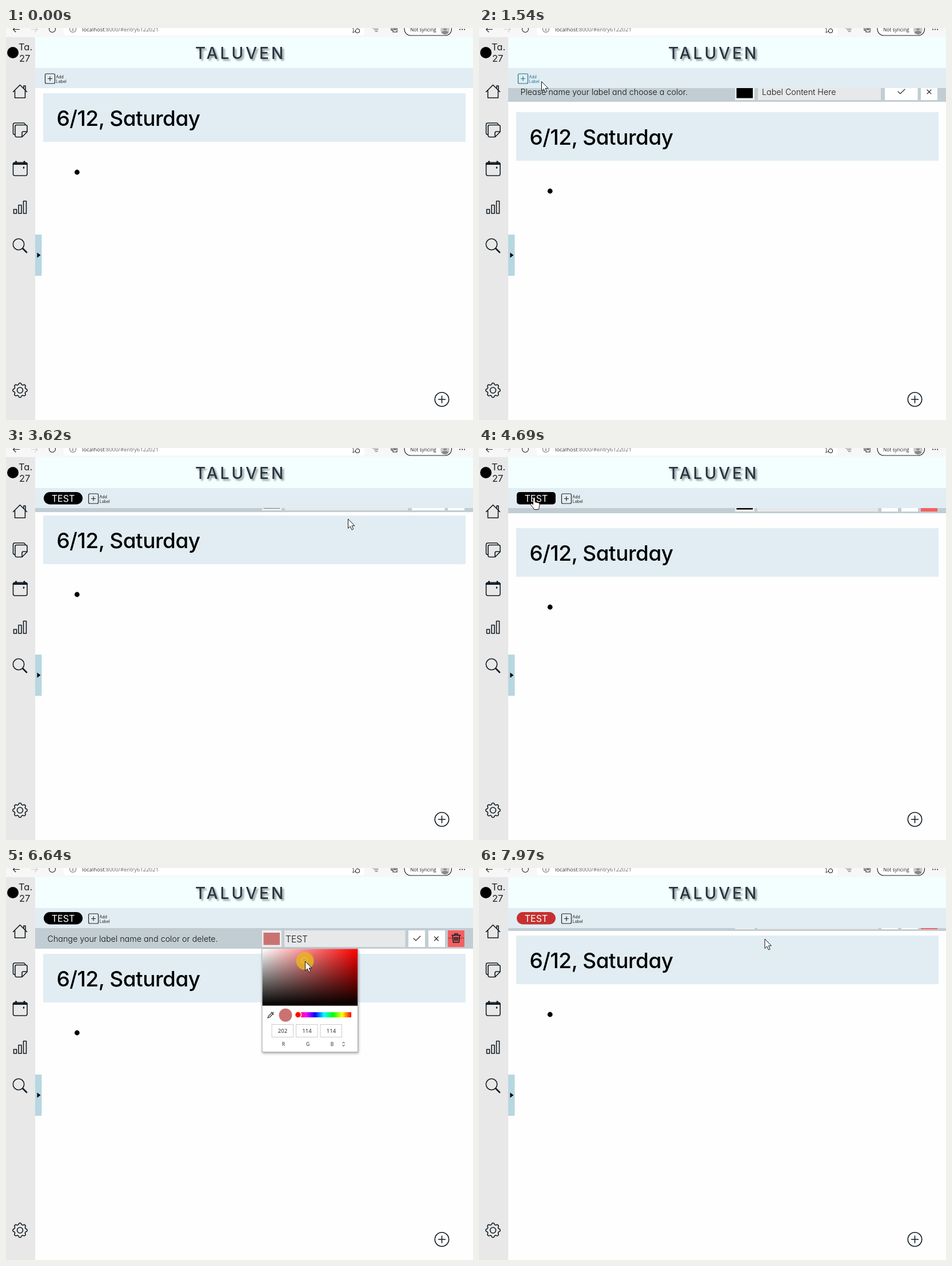
An HTML page for the animation above (8000 ms loop, 817 px wide and 685 px high).

```html
<!DOCTYPE html>
<html lang="en">
<head>
<meta charset="utf-8">
<title>Journal labels</title>
<style>
  html, body { margin: 0; width: 100%; height: 100%; overflow: hidden; background: #fefefe; }
  svg { display: block; }
  text { font-family: Inter, "Open Sans", sans-serif; font-feature-settings: "cv11"; }
  .chrome text, .rgb text { font-family: "Open Sans", sans-serif; }
  .line { fill: none; stroke: #111b22; stroke-width: 1.6; stroke-linejoin: round; stroke-linecap: round; }
  .thin { fill: none; stroke: #222; stroke-width: 1.1; stroke-linecap: round; }
  .body { font-size: 14.3px; font-weight: 300; fill: #111; }
  .mid { text-anchor: middle; }
  .title { font-size: 28px; font-weight: 500; letter-spacing: 4px; fill: #263640; filter: drop-shadow(3px 3px 1.5px #0006); }
</style>
</head>
<body>
<svg width="817" height="685" viewBox="0 0 817 685">
  <defs>
    <linearGradient id="sat"><stop stop-color="#fff"/><stop offset="1" stop-color="#f00"/></linearGradient>
    <linearGradient id="dark" x2="0" y2="1"><stop stop-opacity="0"/><stop offset="1"/></linearGradient>
    <linearGradient id="hue"></linearGradient>
  </defs>
  <rect width="817" height="685" fill="#fefefe"/>

  <g id="page">
    <rect x="65" y="114" width="739" height="85" fill="#e1edf3"/>
    <text x="88.5" y="171" font-size="37" font-weight="500" letter-spacing="-.5">6/12, Saturday</text>
    <circle cx="124.3" cy="252" r="4.4"/>
  </g>

  <g id="addBar">
    <rect x="51" y="105" width="766" height="36" fill="#c1cdd3"/>
    <text class="body" x="72.5" y="128.5">Please name your label and choose a color.</text>
    <rect x="448" y="109" width="34" height="29" fill="#efefef"/>
    <rect x="450.5" y="113" width="28.5" height="21.5"/>
    <rect x="488" y="109.5" width="215" height="28.5" fill="#e7e8ea"/>
    <rect id="focus" x="488.5" y="111" width="211.5" height="27" rx="2.5" fill="#e7e8ea" stroke="#101010" stroke-width="2"/>
    <text id="typed" class="body"></text>
    <path id="caret" class="thin" d="M0 117V133"/>
    <rect id="okay" x="710" y="109" width="57.5" height="29" fill="#fff"/>
    <path class="thin" d="M733 123l4 4 8-8"/>
    <rect x="773" y="109" width="29" height="29" fill="#fff"/>
    <path class="thin" d="M784 120l7 7m0-7l-7 7"/>
  </g>

  <g id="editBar">
    <rect x="51" y="105" width="766" height="36" fill="#c1cdd3"/>
    <text class="body" x="72.5" y="128.5">Change your label name and color or delete.</text>
    <rect x="448" y="109" width="34" height="29" fill="#efefef"/>
    <rect id="swatch" x="450.5" y="113" width="28.5" height="21.5"/>
    <rect x="487" y="109" width="211.5" height="29" fill="#e7e8ea"/>
    <text x="489" y="129.5" font-size="15.6" font-weight="300" fill="#111">TEST</text>
    <rect id="save" x="704" y="109" width="29" height="29" fill="#fff"/>
    <path class="thin" d="M713 123l4 4 8-8"/>
    <rect x="739" y="109" width="29" height="29" fill="#fff"/>
    <path class="thin" d="M749.5 120l7 7m0-7l-7 7"/>
    <rect x="773" y="109" width="29" height="29" fill="#f65f60"/>
    <path d="M773 121h29v3h-29z" fill="#b9595b"/>
    <path class="line" d="M780 117.5H795M785 117v-2h5v2M781.5 118l1 12h10l1-12M785 121v6m2.5-6v6m2.5-6v6"/>
  </g>

  <rect x="51" y="16" width="766" height="54" fill="#f3feff"/>
  <text class="title mid" x="410" y="53.5">TALUVEN</text>
  <rect x="51" y="70" width="766" height="35" fill="#e1edf3"/>
  <g id="label">
    <rect id="pill" x="66" y="77" width="68" height="21.5"/>
    <text class="mid" x="100" y="94" font-size="16" fill="#fff">TEST</text>
  </g>
  <g id="add" fill="#222" stroke="#222">
    <path d="M70.5 80h13a2 2 0 0 1 2 2v13a2 2 0 0 1-2 2h-13a2 2 0 0 1-2-2v-13a2 2 0 0 1 2-2zM77 84.5v8M73 88.5h8" fill="none" stroke-width="1.2"/>
    <g font-size="7" stroke="none"><text x="87.5" y="87.5">Add</text><text x="87.5" y="96.3">Label</text></g>
  </g>

  <rect y="16" width="51" height="669" fill="#e8e8e8"/>
  <circle cx="12" cy="43" r="10"/>
  <g font-size="16.5" fill="#222"><text x="22" y="39">Ta.</text><text x="23" y="58.5">27</text></g>
  <g class="line">
    <path d="M12.5 111.500L24.5 99.5 36.5 111.5M15.5 109v13h18v-13M31 105v-4h3v7"/>
    <path d="M15 186.5a3 3 0 0 1-2.500-3V169a3 3 0 0 1 3-3H31a3 3 0 0 1 2.500 2.500M18.5 169.5h16a2.500 2.500 0 0 1 2.500 2.500v9.500l-9 9h-9.500a2.500 2.500 0 0 1-2.500-2.500v-16a2.500 2.500 0 0 1 2.500-2.500zM28 190v-6.500a2.500 2.500 0 0 1 2.500-2.500h6.300"/>
    <rect x="12.5" y="235" width="24.5" height="23" rx="3"/>
    <path d="M13 237.5H36.500M17.500 233.500v2M32 233.500v2" stroke-width="3"/>
    <path d="M31 243.500v1" stroke-width="2.400"/>
    <path d="M13.500 317h5v7h-5zM22 309.500h5v14.500h-5zM30.500 302.500h5v21.500h-5z"/>
    <circle cx="22" cy="378" r="9.700"/><path d="M29.500 385.500l6.500 6.500" stroke-width="2.800"/>
    <path id="gear"/><circle cx="24.500" cy="633" r="5"/>
    <circle cx="762.500" cy="649" r="12.200"/><path d="M762.500 643v12M756.500 649h12"/>
  </g>
  <rect x="51" y="361" width="11.500" height="72" fill="#b7d7e1"/>
  <path d="M54.500 392.500L60.500 397l-6 4.500z"/>

  <g class="chrome">
    <rect width="817" height="16" fill="#f7f7f7"/>
    <rect x="101" y="-10" width="526" height="23" rx="4" fill="#fff"/>
    <g class="thin">
      <path d="M12.500 2.500h11M17 7l-4.500-4.500 4.500-4.500"/>
      <path d="M44 2.500h11M50.500 7l4.500-4.500-4.500-4.500" stroke="#ccc"/>
      <circle cx="81" cy="2" r="5.500"/><circle cx="117" cy="2" r="5.500" stroke="#777"/>
      <path d="M117 1v4M607 0l1 3-1 5 4-2M641 0h10M644 3h7M646 6h4" stroke="#555"/>
      <circle cx="615" cy="5" r="3.500"/>
      <path d="M674-2v6h2M677-2v9h7V-2M680.500 0v4M678.500 2h4"/>
      <rect x="697" y="-9" width="82.500" height="22" rx="11" fill="#fff"/>
    </g>
    <text x="133" y="6" font-size="9.440" fill="#666"><tspan fill="#333">localhost</tspan>:8000/#entry6122021</text>
    <text x="707" y="5.500" font-size="8.400" fill="#222">Not syncing</text>
    <circle cx="768" cy="3.500" r="8" fill="#c9c9c9"/>
    <path d="M762 9q0-4 6-4t6 4l-6 2.500zM765 1a3 3 0 1 0 6 0z" fill="#888"/>
    <path d="M794 2.500h.1M798 2.500h.1M802 2.500h.1" stroke="#222" stroke-width="2" stroke-linecap="round"/>
  </g>

  <g id="picker">
    <rect x="448" y="141" width="167.500" height="180.500" fill="#fff" stroke="#aaa" style="filter:drop-shadow(1px 2px 2px #0005)"/>
    <rect x="448.500" y="141.500" width="166.500" height="99" fill="url(#sat)"/>
    <rect x="448.500" y="141.500" width="166.500" height="99" fill="url(#dark)"/>
    <circle id="ring" r="5" fill="none" stroke="#fff" stroke-width="1.500"/>
    <path class="thin" d="M458 262l1-3 6-6 2 2-6 6zM464 252l4 4M466 254l2-2"/>
    <circle id="chip" cx="489" cy="257" r="11.500"/>
    <rect x="509" y="252" width="95" height="9" fill="url(#hue)"/>
    <circle cx="511" cy="256.500" r="5.500" fill="#f00" stroke="#fff" stroke-width="1.500"/>
    <g class="rgb mid" font-size="9.600" fill="#222"></g>
    <path d="M588.500 306.500l2-2.500 2 2.500M588.500 309l2 2.500 2-2.500" fill="none" stroke="#333"/>
  </g>

  <g id="cursor">
    <circle id="press" r="15.500" fill="#e6b422" opacity=".85"/>
    <g fill="#fff" stroke="#111" stroke-linejoin="round">
      <path id="arrow" d="M.5.5V17l3.800-3.600 2.700 6 2.700-1.200-2.600-5.800H12z"/>
      <path id="hand" d="M-3.500 2a1.800 1.800 0 0 1 3.600 0v6.500l6 1.200q2 .5 2 2.500l-.6 4.500q-.5 3-1.500 4.800h-7.500q-1-2.500-3.500-5l-3-4q0-2 2.500-1.500l2 1.800z"/>
      <path id="beam" d="M-3-8h2.500l.5.500.5-.5H3M0-7.500v15M-3 8h2.500l.5-.5.5.5H3" fill="none"/>
    </g>
  </g>
</svg>
<script>
const LOOP = 8000, SLIDE = 500, HEIGHT = 36;
const ADD_OPEN = 1225, ADD_CLOSE = 3328, EDIT_OPEN = 4475, EDIT_CLOSE = 7660;
const PICK_FROM = 6150, PICK_TO = 7100;

// time, x, y of the pointer tip
const PATH = [
  [270, 776, 690], [830, 109, 93], [1570, 109, 93], [1960, 490, 130], [2770, 490, 130],
  [2930, 727, 133], [3340, 727, 133], [3620, 598, 123.5], [4330, 98, 86], [5250, 98, 86],
  [5560, 465, 124], [5720, 465, 124], [6080, 500, 190], [6200, 500, 190], [6640, 523, 162.5],
  [6850, 523, 162.5], [7010, 577, 164], [7150, 577, 164], [7400, 718, 125], [7670, 718, 125],
  [7970, 499.5, 123.5]
];
const PRESSES = [[1150, 1235], [1990, 2080], [3230, 3325], [4400, 4480], [5580, 5680], [PICK_FROM, PICK_TO], [7570, 7660]];
const HANDS = [[2880, 3400], [4280, 5320], [7340, 7720]];
const KEYS = [2150, 2300, 2450, 2600];

const $ = id => document.getElementById(id);
const within = (t, a, b) => t >= a && t < b;
const inAny = (t, spans) => spans.some(([a, b]) => within(t, a, b));
const clamp = v => Math.min(1, Math.max(0, v));
const show = (id, on) => $(id).style.display = on ? '' : 'none';
const set = (id, attrs) => Object.entries(attrs).forEach(([k, v]) => $(id).setAttribute(k, v));
const move = (id, x, y) => set(id, { transform: `translate(${x} ${y})` });

// cubic-bezier(.25, .1, .25, 1)
function ease(x) {
  x = clamp(x);
  let lo = 0, hi = 1;
  for (let i = 0; i < 20; i++) {
    const u = (lo + hi) / 2;
    const bx = .75 * u * (1 - u) + u ** 3;
    bx < x ? lo = u : hi = u;
  }
  return .3 * lo * (1 - lo) ** 2 + 3 * lo * lo * (1 - lo) + lo ** 3;
}

// Slid distance, snapped to whole pixels like page layout.
const slide = (t, open, close, openLag = 0, closeLag = 0) => Math.round(HEIGHT * (t < close
  ? ease((t - open - openLag) / SLIDE)
  : 1 - ease((t - close - closeLag) / SLIDE)));

function pointer(t) {
  const i = PATH.findIndex(p => p[0] > t);
  if (i < 0) return PATH.at(-1).slice(1);
  if (i === 0) return PATH[0].slice(1);
  const [t0, x0, y0] = PATH[i - 1], [t1, x1, y1] = PATH[i];
  const u = (t - t0) / (t1 - t0), k = u * u * (3 - 2 * u);
  return [x0 + (x1 - x0) * k, y0 + (y1 - y0) * k];
}

function pick(t) {
  if (t < PICK_FROM) return { x: 448, y: 240, rgb: [0, 0, 0] };
  const [x, y] = pointer(Math.min(t, PICK_TO)).map(v => v - 1);
  const s = clamp((x - 449) / 167), v = 255 * (1 - clamp((y - 141) / 99));
  return { x, y, rgb: [v, v * (1 - s), v * (1 - s)].map(Math.round) };
}

function build() {
  let gear = '';
  for (let i = 0; i < 96; i++) {
    const a = i / 96 * Math.PI * 2, r = 11.3 + 1.3 * Math.tanh(2 * Math.cos(8 * a));
    gear += `${i ? 'L' : 'M'}${24.5 + r * Math.cos(a)} ${633 + r * Math.sin(a)}`;
  }
  set('gear', { d: gear + 'z' });
  $('hue').innerHTML = [0, 1, 2, 3, 4, 5, 6]
    .map(i => `<stop offset="${i / 6}" stop-color="hsl(${360 - 60 * i} 100% 50%)"/>`).join('');
  document.querySelector('.rgb').innerHTML = [...'RGB'].map((c, i) => {
    const x = 484 + 42.5 * i;
    return `<rect x="${x - 19}" y="273.5" width="37.5" height="22" fill="#fff" stroke="#ccc"/>
      <text id="val${i}" x="${x}" y="288"></text><text x="${x + 1.5}" y="311" font-size="8.5">${c}</text>`;
  }).join('');
}

function renderBars(t) {
  const editing = t >= 4400;
  const times = editing ? [EDIT_OPEN, EDIT_CLOSE] : [ADD_OPEN, ADD_CLOSE];
  const barY = slide(t, ...times, 125, 35) - HEIGHT;
  move('page', 0, slide(t, ...times));
  move('addBar', 0, barY);
  move('editBar', 0, barY);
  show('addBar', !editing);
  show('editBar', editing);
  set('okay', { fill: within(t, 2880, 3400) ? '#e7ebee' : '#fff' });
  set('save', { fill: within(t, 7340, 7720) ? '#e7ebee' : '#fff' });
}

function renderField(t) {
  const focused = within(t, 2040, ADD_CLOSE);
  const count = focused ? KEYS.filter(k => t >= k).length : 0;
  const typed = $('typed');
  typed.textContent = count ? 'TEST'.slice(0, count) : 'Label Content Here';
  typed.style.fontSize = count ? '13.2px' : '';
  set('typed', { x: count ? 490 : 495, y: count ? 130 : 128.5 });
  show('focus', focused);
  show('caret', focused);
  move('caret', count ? 491 + typed.getComputedTextLength() : 490.5, 0);
}

function renderLabels(t) {
  const { x, y, rgb } = pick(t), color = `rgb(${rgb})`, labelled = t >= ADD_CLOSE;
  set('swatch', { fill: color });
  set('chip', { fill: color });
  move('ring', x, y);
  rgb.forEach((v, i) => $('val' + i).textContent = v);
  show('picker', within(t, 5680, 7360));
  show('label', labelled);
  set('pill', { fill: t >= EDIT_CLOSE ? color : '#000', rx: within(t, 4280, 5320) ? 5 : 10.75 });
  move('add', labelled ? 76 : 0, 0);
  const tint = within(t, 800, 1620) ? '#1d7285' : '#222';
  set('add', { fill: tint, stroke: tint });
}

function renderCursor(t) {
  const hand = inAny(t, HANDS), beam = within(t, 1920, 2800);
  show('cursor', t >= 270);
  show('press', inAny(t, PRESSES));
  show('hand', hand);
  show('beam', beam);
  show('arrow', !hand && !beam);
  move('cursor', ...pointer(t));
}

build();
const start = performance.now();
function tick() {
  const t = (performance.now() - start) % LOOP;
  [renderBars, renderField, renderLabels, renderCursor].forEach(part => part(t));
  requestAnimationFrame(tick);
}
tick();
</script>
</body>
</html>
```
